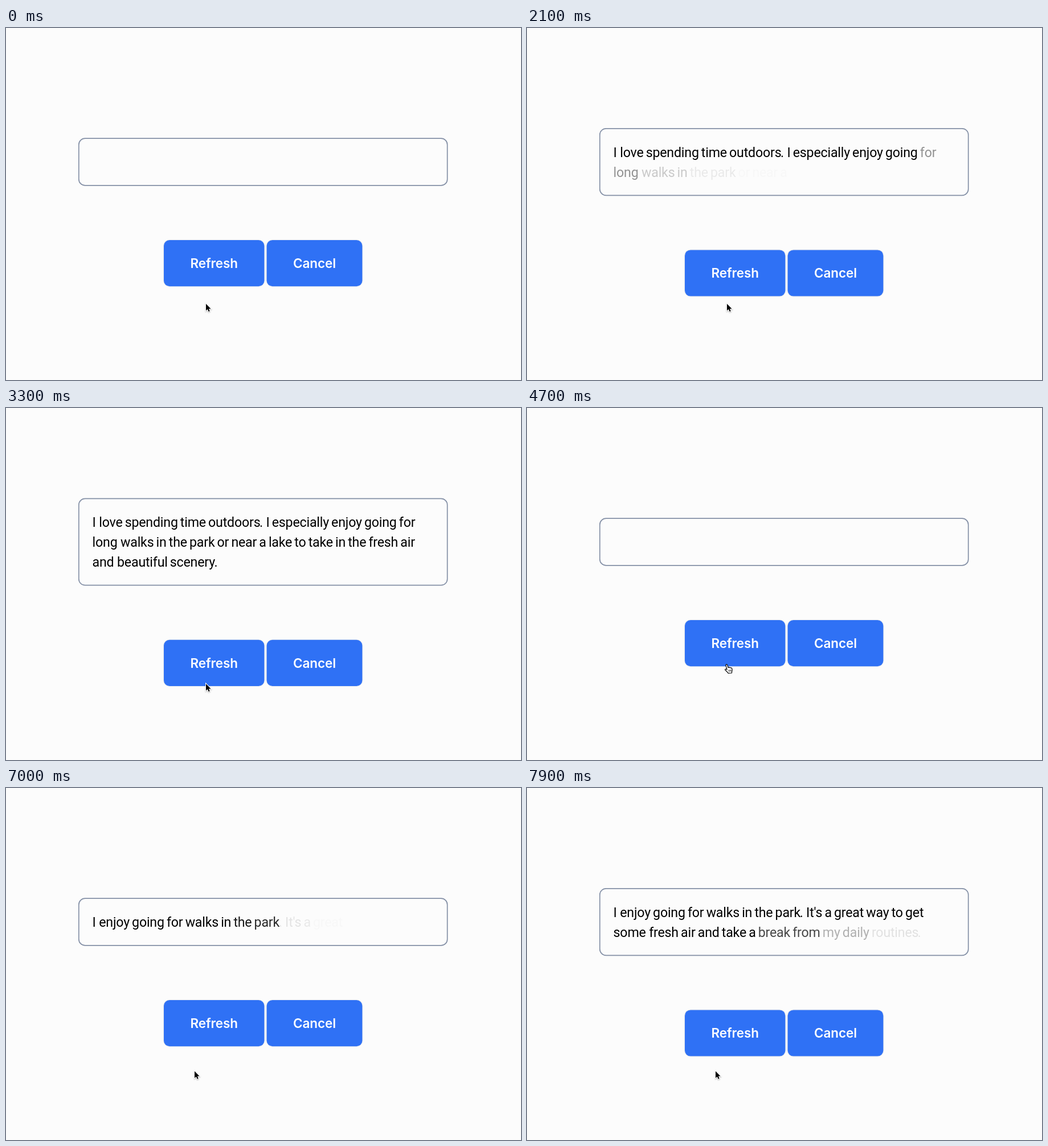
An HTML page with a canvas for the animation above (8 s loop, 904 by 619 pixels).

```html
<!DOCTYPE html>
<html lang="en">
<head>
<meta charset="utf-8">
<title>Streaming text</title>
<style>
  html, body { margin: 0; width: 100%; height: 100%; overflow: hidden; background: #fcfcfc; }
  canvas { display: block; }
</style>
</head>
<body>
<canvas id="stage" width="904" height="619"></canvas>
<script>
const ctx = document.getElementById('stage').getContext('2d');

const LOOP = 8000, STEP = 100;
const FADE = 600;
const LINE = 34.8;
const CLICK = 4500;

// Each burst is [arrival in ms, number of tokens].
const passages = [
  {
    from: 0, to: CLICK,
    text: 'I love spending time outdoors. I especially enjoy going for\n' +
          'long walks in the park or near a lake to take in the fresh air\n' +
          'and beautiful scenery.',
    bursts: [[600, 1], [1000, 1], [1205, 2], [1240, 2], [1330, 1], [1400, 1], [1470, 1],
             [1530, 1], [1833, 2], [1928, 2], [2000, 2], [2050, 3], [2130, 2], [2200, 2],
             [2290, 3], [2400, 2], [2520, 2]]
  },
  {
    from: CLICK, to: LOOP,
    text: "I enjoy going for walks in the park. It's a great way to get\n" +
          'some fresh air and take a break from my daily routines.',
    bursts: [[6100, 1], [6200, 2], [6300, 2], [6390, 1], [6508, 1], [6550, 1], [6885, 2],
             [6900, 1], [6950, 1], [7050, 3], [7150, 1], [7200, 2], [7290, 3], [7510, 2],
             [7682, 2], [7780, 2]]
  }
];

const arrowShape = new Path2D('M0 0V12L2.8 9.5L4.7 13.8L6.7 13L4.9 8.8H8.6Z');
const handShape = new Path2D(
  'M4 10L2.1 3.2Q1.8 .8 3.2 .8Q4.5 .8 5 2.6L6 6.4Q7.4 5.4 8.2 6.6Q9.6 5.8 10.4 7' +
  'Q12 6.4 12.8 8.2Q13.7 11 12.6 13.4L12.4 16L6.2 16.4Q4 13.4 .9 10.8Q.3 8.9 2 9Z');
const handCreases = new Path2D('M7 10.6L7.5 13.6M9 10.4L9.4 13.4M10.9 10.2L11.1 13.2');

const clamp01 = v => Math.min(1, Math.max(0, v));
const smooth = v => { const u = clamp01(v); return u * u * (3 - 2 * u); };
const mix = (a, b, u) => a + (b - a) * u;

function setType(font, tracking, wordGap) {
  ctx.font = font;
  ctx.letterSpacing = tracking + 'px';
  ctx.wordSpacing = wordGap + 'px';
}

const bodyType = () => setType('400 23.2px Roboto, sans-serif', -0.2, -1.4);
const buttonType = () => setType('600 22.5px Inter, sans-serif', -0.1, 0);

// Turns a passage into placed tokens with arrival times.
function layOut({ text, bursts }) {
  const arrivals = bursts.flatMap(([at, count]) => Array(count).fill(at));
  const last = arrivals[arrivals.length - 1];
  let index = 0;
  bodyType();
  return text.split('\n').flatMap((line, row) => {
    let before = '';
    return line.match(/ ?[\w']+|\./g).map(word => {
      const token = { word, row, x: ctx.measureText(before).width, at: arrivals[index++] ?? last };
      before += word;
      return token;
    });
  });
}

function roundRect(x, y, w, h, r) {
  ctx.beginPath();
  ctx.roundRect(x, y, w, h, r);
}

function drawField(rows) {
  const extra = (rows - 1) * LINE;
  roundRect(127.8, 194.2 - extra / 2, 646.9, 82.7 + extra, 11);
  ctx.strokeStyle = '#8490a6';
  ctx.lineWidth = 1.7;
  ctx.stroke();
}

function drawText(tokens, rows, t) {
  bodyType();
  ctx.textAlign = 'left';
  ctx.fillStyle = '#000';
  const baseline = 244.2 - (rows - 1) * LINE / 2;
  for (const { word, row, x, at } of tokens) {
    ctx.globalAlpha = smooth((t - at) / FADE);
    ctx.fillText(word, 151.6 + x, baseline + row * LINE);
  }
  ctx.globalAlpha = 1;
}

function drawButton(label, x, width, rows) {
  const y = 373 + (rows - 1) * LINE / 2;
  roundRect(x - 0.8, y - 0.8, width + 1.6, 82.8, 11);
  ctx.fillStyle = '#e4e6ea';
  ctx.fill();
  roundRect(x, y, width, 81.2, 10);
  ctx.fillStyle = '#2f71f5';
  ctx.fill();
  buttonType();
  ctx.textAlign = 'center';
  ctx.fillStyle = '#fff';
  ctx.fillText(label, x + width / 2, y + 48.8);
}

function drawArrow(x, y) {
  ctx.save();
  ctx.translate(x, y);
  ctx.shadowColor = 'rgba(0,0,0,.3)';
  ctx.shadowBlur = 2;
  ctx.shadowOffsetY = 1;
  ctx.strokeStyle = '#fff';
  ctx.lineWidth = 2;
  ctx.stroke(arrowShape);
  ctx.shadowColor = 'transparent';
  ctx.fillStyle = '#000';
  ctx.fill(arrowShape);
  ctx.restore();
}

function drawHand(x, y) {
  ctx.save();
  ctx.translate(x, y);
  ctx.lineJoin = 'round';
  ctx.fillStyle = '#fff';
  ctx.strokeStyle = '#000';
  ctx.lineWidth = 1.2;
  ctx.fill(handShape);
  ctx.stroke(handShape);
  ctx.lineWidth = 0.8;
  ctx.stroke(handCreases);
  ctx.restore();
}

function drawPointer(t) {
  const enter = smooth((t - 4000) / 300);
  const leave = smooth((t - 4700) / 400);
  const x = mix(351, 331, leave);
  const y = mix(mix(485, 450, enter), 498, leave);
  if (t >= 4100 && t < 4900) drawHand(x - 4, y);
  else drawArrow(x, y);
}

for (const passage of passages) passage.tokens = layOut(passage);

function draw(now) {
  const t = Math.floor((now % LOOP) / STEP) * STEP;
  const { tokens } = passages.find(p => t >= p.from && t < p.to);
  const arrived = tokens.filter(token => token.at <= t);
  const rows = 1 + Math.max(0, ...arrived.map(token => token.row));

  ctx.fillStyle = '#fcfcfc';
  ctx.fillRect(0, 0, 904, 619);
  drawField(rows);
  drawText(arrived, rows, t);
  drawButton('Refresh', 277, 176.4, rows);
  drawButton('Cancel', 457.6, 167.8, rows);
  drawPointer(t);
}

const start = performance.now();
function tick() {
  draw(performance.now() - start);
  requestAnimationFrame(tick);
}
tick();
</script>
</body>
</html>
```
